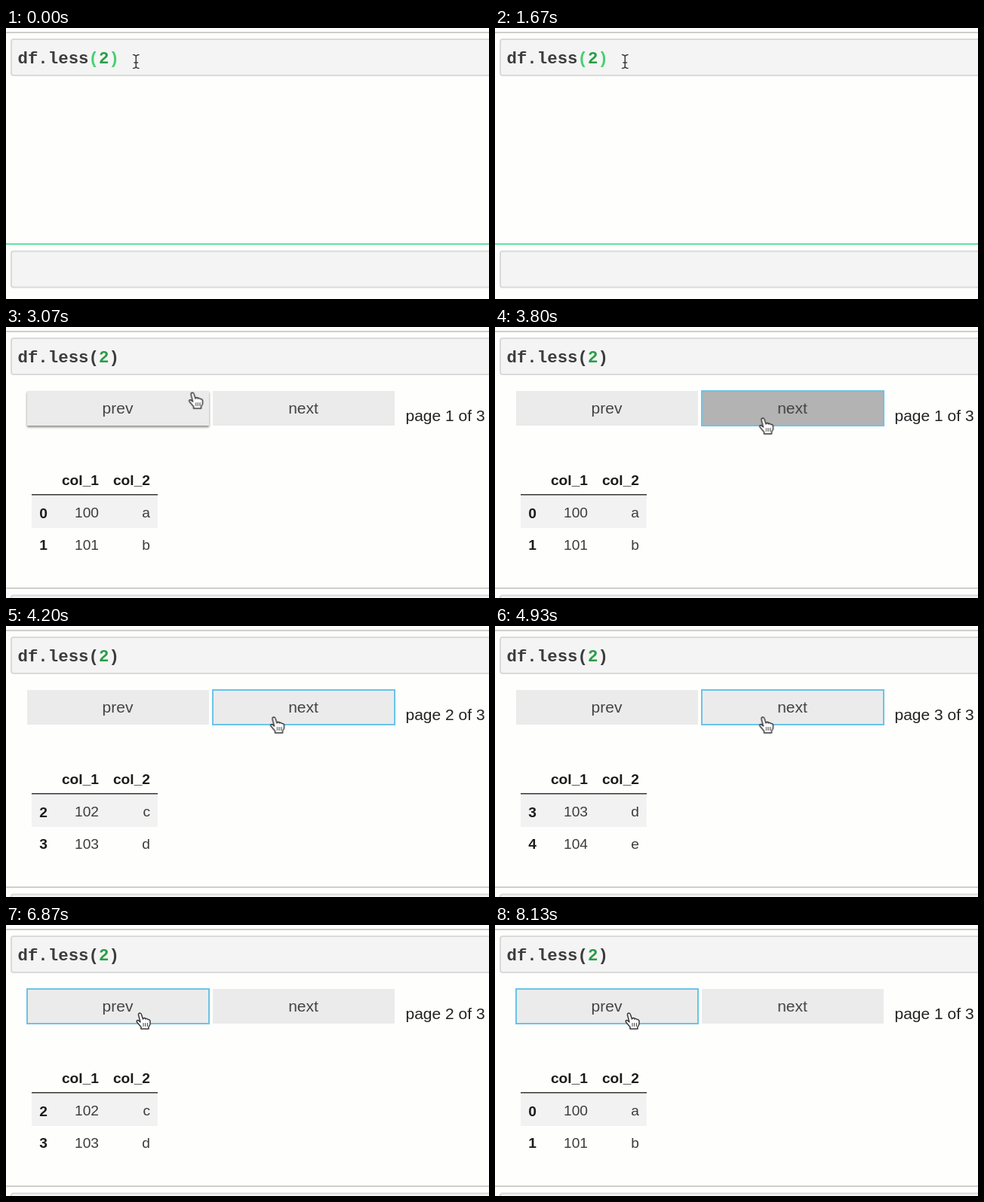
These frames come from a looping animation (640 by 360 pixels, 8.34 s). An HTML page:

```html
<!DOCTYPE html>
<html lang="en">
<head>
<meta charset="utf-8">
<title>Paged data frame</title>
<style>
html, body { margin: 0; width: 100%; height: 100%; overflow: hidden; background: #fefefd; }
svg { display: block; width: 640px; height: 360px; }

.cell { fill: #f4f4f4; stroke: #dadada; stroke-width: 2; }
.rule { fill: #cfcfcb; }
.code { font: bold 22.4px "Liberation Mono", "Courier New", monospace; fill: #3c3c3c; white-space: pre; }
.num { fill: #2a9d48; }
.match { fill: #45d070; }
.ui { font: 21px "Liberation Sans", Arial, sans-serif; fill: #444; }
.page { fill: #222; }
.label { text-anchor: middle; }
.table { font: 19.2px "Liberation Sans", Arial, sans-serif; fill: #3c3c3c; text-anchor: end; }
.head { font-weight: bold; fill: #1c1c1c; }
.index { font-weight: bold; fill: #1c1c1c; text-anchor: middle; }
.button { fill: #ebebeb; }
.focus { fill: none; stroke: #69c4e8; stroke-width: 2; }
.press { fill: #b3b3b3; }

/* Every timed layer shares one clock */
.t { opacity: 0; animation: 8340ms step-end infinite; }
.idle { animation-name: idle; }
.caret { animation-name: caret; }
.collapsed { animation-name: collapsed; }
.ran { animation-name: ran; }
.widget { animation-name: widget; }
.p1 { animation-name: p1; }
.p2 { animation-name: p2; }
.p3 { animation-name: p3; }
.hover-prev { animation-name: hover-prev; }
.hover-next { animation-name: hover-next; }
.focus-prev { animation-name: focus-prev; }
.focus-next { animation-name: focus-next; }
.press-prev { animation-name: press-prev; }
.press-next { animation-name: press-next; }
.pointer { animation-name: pointer; }
.path { animation: path 8340ms ease-in-out infinite; }

@keyframes idle { 0% { opacity: 1 } 24.82% { opacity: 0 } }
@keyframes caret { .96%, 13.67% { opacity: 1 } 7.31%, 20.02% { opacity: 0 } }
@keyframes collapsed { 24.82% { opacity: 1 } 26.38% { opacity: 0 } }
@keyframes ran { 24.82% { opacity: 1 } }
@keyframes widget { 26.38% { opacity: 1 } }
@keyframes p1 { 0%, 92.45% { opacity: 1 } 47.12% { opacity: 0 } }
@keyframes p2 { 47.12%, 80.82% { opacity: 1 } 58.27%, 92.45% { opacity: 0 } }
@keyframes p3 { 58.27% { opacity: 1 } 80.82% { opacity: 0 } }
@keyframes hover-prev { 34.77%, 68.7% { opacity: 1 } 38.13%, 79.14% { opacity: 0 } }
@keyframes hover-next { 38.13% { opacity: 1 } 44.72% { opacity: 0 } }
@keyframes focus-next { 44.72% { opacity: 1 } 79.14% { opacity: 0 } }
@keyframes focus-prev { 79.14% { opacity: 1 } }
@keyframes press-next { 44.72%, 56.71% { opacity: 1 } 46.4%, 57.55% { opacity: 0 } }
@keyframes press-prev { 79.14%, 91.13% { opacity: 1 } 80.34%, 92.21% { opacity: 0 } }
@keyframes pointer { 34.77% { opacity: 1 } }
@keyframes path {
  0%, 34.77% { transform: translate(226px, 78px); animation-timing-function: ease-in }
  36.81% { transform: translate(241px, 86px); animation-timing-function: ease-out }
  41.37%, 62.95% { transform: translate(349.5px, 120px) }
  74.34%, 100% { transform: translate(172px, 116px) }
}
</style>
</head>
<body>
<svg viewBox="0 0 640 360">
  <defs>
    <linearGradient id="edge" x2="0" y2="1">
      <stop stop-color="#cbcbcb"/>
      <stop offset=".35" stop-color="#dcdcdc"/>
      <stop offset="1" stop-color="#e9e9e8"/>
    </linearGradient>
    <filter id="shade" x="-10%" y="-20%" width="120%" height="150%">
      <feDropShadow dx="0" dy="2" stdDeviation="1.6" flood-color="#444" flood-opacity=".65"/>
    </filter>
    <rect id="box" x="7" y="1" width="650" height="48" rx="3"/>
    <rect id="prev" x="28" y="85" width="241" height="46"/>
    <rect id="next" x="274" y="85" width="241" height="46"/>
    <path id="beam" d="M168.5 35.5q3 0 3.8 2q.8-2 3.8-2M172.3 37.5v14M168.5 53.5q3 0 3.8-2q.8 2 3.8 2M170 46h4.6"/>
  </defs>

  <rect width="640" height="360" fill="#fefefd"/>
  <rect class="rule" y="5" width="640" height="2"/>
  <use href="#box" y="14" class="cell"/>

  <g class="t idle">
    <text class="code" x="15.5" y="47">df.less<tspan class="match">(</tspan><tspan class="num">2</tspan><tspan class="match">)</tspan></text>
    <rect class="t caret" x="151" y="29" width="1.5" height="25" fill="#333"/>
    <g fill="none" stroke-linecap="round">
      <use href="#beam" stroke="#fff" stroke-width="3.5"/>
      <use href="#beam" stroke="#3a3a3a" stroke-width="1.6"/>
    </g>
    <rect y="286" width="640" height="2" fill="#66dfa4"/>
    <use href="#box" y="295.5" class="cell"/>
  </g>

  <text class="code t ran" x="15.5" y="47">df.less(<tspan class="num">2</tspan>)</text>

  <g class="t collapsed">
    <rect class="rule" y="72" width="640" height="2"/>
    <use href="#box" y="82" class="cell"/>
    <rect y="167" width="640" height="193" fill="#e9e9e8"/>
    <rect y="166" width="640" height="16" fill="url(#edge)"/>
  </g>

  <g class="t widget">
    <use href="#prev" class="button"/>
    <use href="#next" class="button"/>
    <g class="t hover-prev"><use href="#prev" class="button" filter="url(#shade)"/></g>
    <g class="t hover-next"><use href="#next" class="button" filter="url(#shade)"/></g>
    <g class="t press-prev"><use href="#prev" class="press"/></g>
    <g class="t press-next"><use href="#next" class="press"/></g>
    <g class="t focus-prev"><use href="#prev" class="focus"/></g>
    <g class="t focus-next"><use href="#next" class="focus"/></g>
    <text class="ui label" x="148" y="115">prev</text>
    <text class="ui label" x="394" y="115">next</text>

    <g class="table">
      <text class="head" x="123" y="210">col_1</text>
      <text class="head" x="191" y="210">col_2</text>
      <rect x="34" y="224" width="167" height="43" fill="#f2f2f2"/>
      <rect x="34" y="222" width="167" height="1.5" fill="#333"/>
    </g>

    <g class="t p1">
      <text class="ui page" x="529.5" y="125">page 1 of 3</text>
      <g class="table">
        <text class="index" x="49.5" y="254">0</text><text x="123" y="253">100</text><text x="191" y="253">a</text>
        <text class="index" x="49.5" y="296">1</text><text x="123" y="296">101</text><text x="191" y="296">b</text>
      </g>
    </g>
    <g class="t p2">
      <text class="ui page" x="529.5" y="125">page 2 of 3</text>
      <g class="table">
        <text class="index" x="49.5" y="254">2</text><text x="123" y="253">102</text><text x="191" y="253">c</text>
        <text class="index" x="49.5" y="296">3</text><text x="123" y="296">103</text><text x="191" y="296">d</text>
      </g>
    </g>
    <g class="t p3">
      <text class="ui page" x="529.5" y="125">page 3 of 3</text>
      <g class="table">
        <text class="index" x="49.5" y="254">3</text><text x="123" y="253">103</text><text x="191" y="253">d</text>
        <text class="index" x="49.5" y="296">4</text><text x="123" y="296">104</text><text x="191" y="296">e</text>
      </g>
    </g>

    <rect class="rule" y="346" width="640" height="2"/>
    <use href="#box" y="355.5" class="cell"/>

    <g class="t pointer">
      <g class="path" stroke="#383838" stroke-width="1.5" stroke-linecap="round" stroke-linejoin="round">
        <path fill="#fff" d="M7 22V19.5L1.5 13Q.5 10.5 3 10.5L6 13L3.5 3.5Q3.5 1 5.5 1Q7 1 7.5 3L9.5 9Q10 7 12 7.5L13 9Q14.5 7.5 16 9.5Q18.5 9 19 11.5V16L17 19.5V22Z"/>
        <path fill="none" d="M10 14.5v4M12.7 14.5v4M15.4 14.5v4" stroke-width="1"/>
      </g>
    </g>
  </g>
</svg>
</body>
</html>
```
